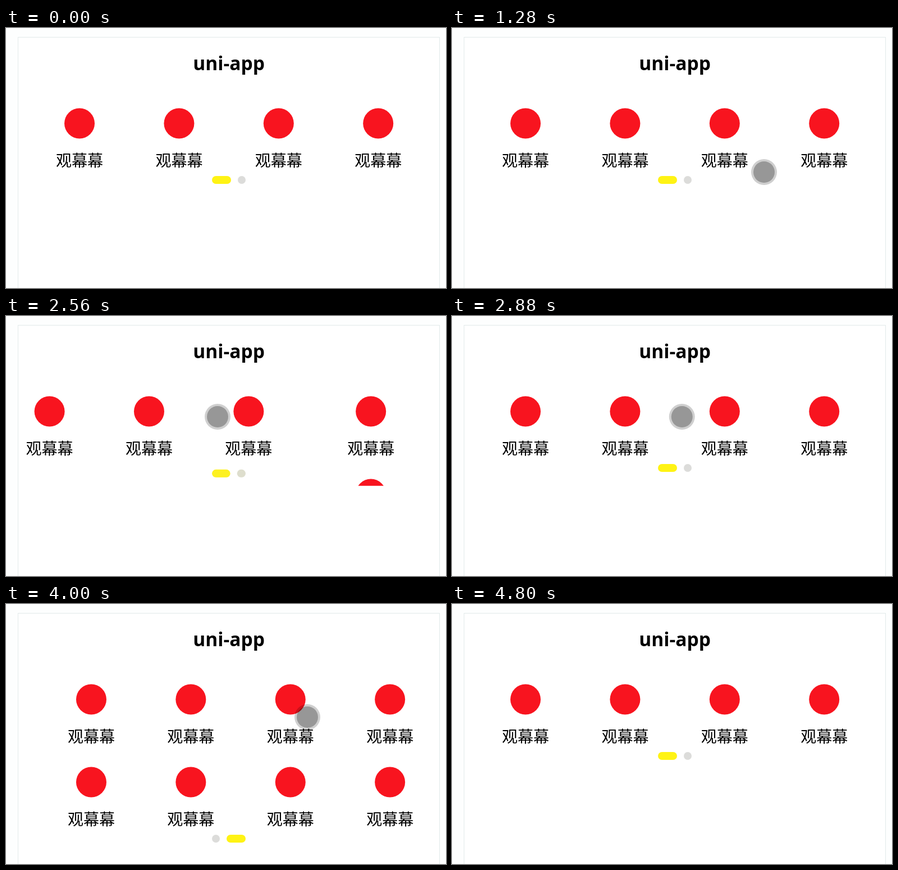
An HTML page with a canvas that plays this animation: 784x462 px, repeating every 5.44 s.

```html
<!DOCTYPE html>
<html lang="zh-CN">
<head>
<meta charset="utf-8">
<title>uni-app</title>
<style>
  html, body { margin: 0; width: 100%; height: 100%; overflow: hidden; background: #fff; }
  canvas { display: block; }
</style>
</head>
<body>
<canvas id="stage" width="784" height="462"></canvas>
<script>
const ctx = document.getElementById('stage').getContext('2d');
const LOOP = 5440, STEP = 160, SWIPE = 320;
const PAGE_WIDTH = 750, ROW_HEIGHT = 147, COLUMN_WIDTH = 177.4;
const LABEL = '观幕幕';
const YELLOW = [255, 243, 20], GREY = [220, 220, 218];

const clamp = k => Math.min(1, Math.max(0, k));
const mix = (a, b, k) => a + (b - a) * k;
const easeOut = (k, power) => 1 - (1 - clamp(k)) ** power;
const easeInOut = k => k * k * (3 - 2 * k);

// Two swipes forward and two back; a higher power settles sooner.
function pageAt(t, power) {
  const swipe = start => easeOut((t - start) / SWIPE, power);
  return swipe(1520) - swipe(2400) + swipe(3719) - swipe(4320);
}

// The first page is pulled past its edge and springs back.
const overdrag = t => 45.5 * Math.sin(Math.PI * clamp((t - 3040) / 640));

// The pointer glides between a few resting places.
const POINTER = [
  { t: 320, x: 600, y: 393 },
  { t: 1280, x: 556, y: 256 },
  { t: 1920, x: 531, y: 239 },
  { t: 2560, x: 377, y: 179 },
  { t: 3360, x: 470, y: 179 },
  { t: 4000, x: 537, y: 201 },
  { t: 4800, x: 600, y: 215 }
];

function pointerAt(t) {
  const next = POINTER.findIndex(place => place.t > t);
  if (next < 1) return null;
  const a = POINTER[next - 1], b = POINTER[next];
  const k = easeInOut((t - a.t) / (b.t - a.t));
  return { x: mix(a.x, b.x, k), y: mix(a.y, b.y, k) };
}

function disc(x, y, radius, color) {
  ctx.fillStyle = color;
  ctx.beginPath();
  ctx.arc(x, y, radius, 0, Math.PI * 2);
  ctx.fill();
}

function text(value, x, y, font) {
  ctx.font = font;
  ctx.textAlign = 'center';
  ctx.fillStyle = '#000';
  ctx.fillText(value, x, y);
}

function drawPage(left, rows) {
  for (let row = 0; row < rows; row++) {
    for (let column = 0; column < 4; column++) {
      const x = left + 131 + column * COLUMN_WIDTH, y = row * ROW_HEIGHT;
      disc(x, y + 169.5, 27, '#f8141f');
      text(LABEL, x, y + 246, '28px "Noto Sans CJK SC", "Noto Sans CJK", sans-serif');
    }
  }
}

// Returns where the following dot begins.
function drawDot(x, y, active) {
  const width = mix(14, 34, active);
  const rgb = GREY.map((v, i) => Math.round(mix(v, YELLOW[i], active)));
  ctx.fillStyle = `rgb(${rgb})`;
  ctx.beginPath();
  ctx.roundRect(x, y - 7, width, 14, 7);
  ctx.fill();
  return x + width + 12;
}

function drawFrame() {
  ctx.fillStyle = '#fdfefe';
  ctx.fillRect(0, 0, 784, 462);
  ctx.fillStyle = '#fff';
  ctx.fillRect(22, 17, PAGE_WIDTH, 445);
  ctx.strokeStyle = '#e2eaea';
  ctx.strokeRect(21.5, 16.5, PAGE_WIDTH + 1, 460);
  text('uni-app', 397, 75, 'bold 33.5px "Noto Sans", "Open Sans", sans-serif');
}

function draw(t) {
  const scroll = overdrag(t) - PAGE_WIDTH * pageAt(t, 1.7);
  const page = pageAt(t, 3.9);
  const growth = page * ROW_HEIGHT;
  const pointer = pointerAt(t);

  drawFrame();
  ctx.save();
  ctx.beginPath();
  ctx.rect(22, 100, PAGE_WIDTH, 192 + growth);
  ctx.clip();
  drawPage(scroll, 1);
  drawPage(scroll + PAGE_WIDTH, 2);
  ctx.restore();

  const dotY = 270 + growth;
  drawDot(drawDot(367, dotY, 1 - page), dotY, page);
  if (pointer) {
    disc(pointer.x, pointer.y, 23, 'rgba(0,0,0,.19)');
    disc(pointer.x, pointer.y, 19, 'rgba(0,0,0,.27)');
  }
}

function tick() {
  const t = performance.now() % LOOP;
  draw(Math.floor(t / STEP) * STEP);
  requestAnimationFrame(tick);
}
tick();
</script>
</body>
</html>
```
